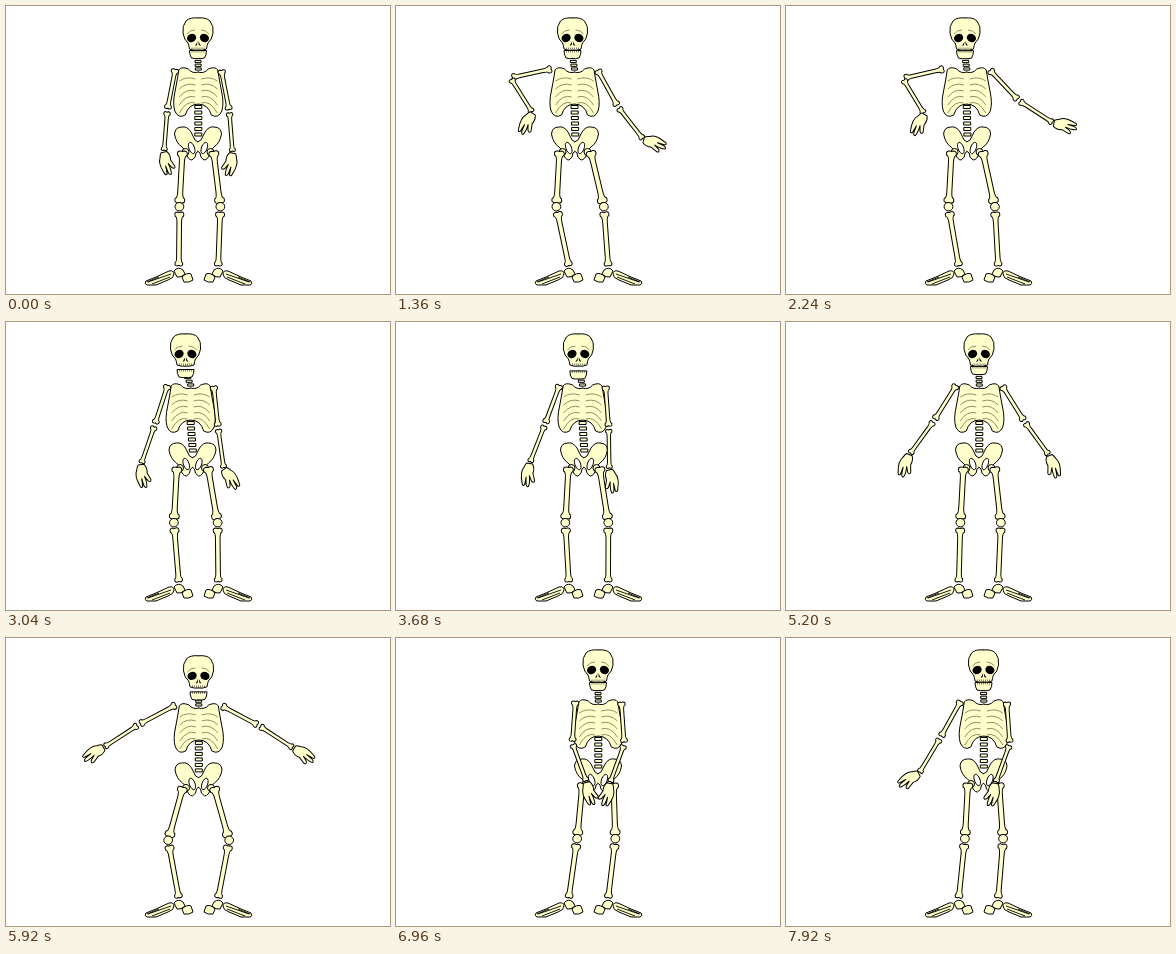
An HTML page with a canvas that plays this animation: 384x288 px, repeating every 8000 ms.

```html
<!DOCTYPE html>
<html lang="en">
<head>
<meta charset="utf-8">
<title>Talking skeleton</title>
<style>
html, body { margin: 0; width: 100%; height: 100%; overflow: hidden; background: #fff; }
canvas { display: block; width: 384px; height: 288px; }
</style>
</head>
<body>
<canvas id="stage" width="384" height="288"></canvas>
<script>
const g = document.getElementById('stage').getContext('2d');
const LOOP = 8000, STEP = 80, HOLD = .3;
const BONE = '#ffffcc', INK = '#000', SHADE = '#8f8f66';
const SIDES = [-1, 1], MID = 192.5, ARM = 42;

// Arm gestures: outward swing from straight down, in degrees
const arm = (upper, fore, hand) => ({ upper, fore, hand });
const hang = arm(11, 4.5, -11), low = arm(32, 36, 22), away = arm(18, 19, -7);
const akimbo = arm(78, -32, 32), point = arm(29, 38, 74), reach = arm(44, 58, 82);
const flick = arm(6, 8, 37), offer = arm(30, 31, 82), show = arm(29, 31, 62);
const cross = arm(-3, -28, -82), fold = arm(4, -20, -13);
const wide = arm(62, 57, 60), level = arm(82, 87, 88);

const pose = (t, x, left, right = left, lean = 0, mouth = 0) => ({ t, x, left, right, lean, mouth });
const poses = [
  pose(0, 192, hang),
  pose(1360, 179, akimbo, point, -2.5),
  pose(1800, 181, akimbo, reach, -2),
  pose(3040, 186.5, away, flick, -7, 3),
  pose(4320, 194, offer, cross),
  pose(5200, 193, low),
  pose(5600, 192.5, level),
  pose(5920, 192.5, wide, wide, 0, 3.5),
  pose(6160, 194, low),
  pose(6960, 202, fold),
  pose(7840, 197.5, show, fold),
  pose(LOOP, 197.5, show, fold)
];

const clamp = (n, a, b) => Math.min(b, Math.max(a, n));
const ease = k => k * k * (3 - 2 * k);

function mix(a, b, k) {
  if (typeof a === 'number') return a + (b - a) * k;
  return Object.fromEntries(Object.keys(a).map(key => [key, mix(a[key], b[key], k)]));
}

function poseAt(t) {
  const i = poses.findLastIndex(p => p.t <= t), a = poses[i], b = poses[i + 1];
  const k = (t - a.t) / (b.t - a.t);
  const p = mix(a, b, ease(clamp((k - HOLD) / (1 - HOLD), 0, 1)));
  // The jaw chatters between poses, the knees give way when both arms rise
  const words = Math.round((b.t - a.t) / 400);
  p.mouth += 2 * Math.sin(Math.PI * k * words) ** 2;
  p.drop = clamp((Math.min(p.left.upper, p.right.upper) - 45) * .23, 0, 4);
  return p;
}

function line(path, color = INK, width = 1) {
  g.strokeStyle = color;
  g.lineWidth = width;
  g.stroke(path);
}
function fill(path, color = BONE) {
  g.fillStyle = color;
  g.fill(path);
  line(path);
}
function oval(x, y, rx, ry, tilt = 0) {
  const path = new Path2D();
  path.ellipse(x, y, rx, ry, tilt, 0, 7);
  return path;
}
function at(x, y, draw, angle = 0, sx = 1, sy = 1) {
  g.save();
  g.translate(x, y);
  g.rotate(angle);
  g.scale(sx, sy);
  draw();
  g.restore();
}
const mirrored = (draw, x = 0) => SIDES.forEach(s => at(x, 0, draw, 0, s));

// Halves, drawn to the right of the middle line
const skull = new Path2D('M-.5 12Q8 11 12 15Q16 20 15 27Q14 34 10 37Q9 39 8.5 43Q4 45 -.5 44');
const jaw = new Path2D('M-.5 44.5H8.5Q8.5 49 6.5 52Q3 53 -.5 52.5');
const cage = new Path2D('M-.5 66Q6 68 10 63Q17 60 19.5 64Q21 74 23 84Q26 97 23.5 105Q20 113 13 109Q10 98 -.5 98');
const hips = new Path2D('M-.5 136L3 134Q5 130 7 126Q11 120 16 121Q23 121 23.5 128Q22 137 16 141Q13 143 12 147Q10 154 6 154Q2 152 2 147L-.5 145');
const nose = new Path2D('M.2 35L3 40L.8 39Z');
const brow = new Path2D('M3 24Q8 24 11 28');

const palm = new Path2D('M0-3Q4-6 9-5L16-8Q19-8 17-5L12-2Q19-4 23-3Q24-1 20 0L14 1L22 1Q24 3 20 4Q10 8 5 5Q1 4 0 3Z');
const toes = new Path2D('M163 265Q168 264 168 268Q168 272 162 274L150 279H141Q138 278 140 275L150 271Z');
const toeLines = new Path2D('M165 268L142 276M164 271L146 278M153 271L141 276');
const ankle = new Path2D('M168 265Q172 260 177 264L179 268Q175 272 171 271Z');
const heel = new Path2D('M176 271Q181 266 185 268L187 274Q183 277 178 276Z');

// Bone along a line; a and b are the half widths of its end knobs
function bone(x1, y1, x2, y2, w, a, b, trim1 = 0, trim2 = 0) {
  const half = (Math.hypot(x2 - x1, y2 - y1) - trim1 - trim2) / 2;
  const path = new Path2D();
  // dir runs out along one edge of the shaft, around the knob, to the other edge
  const end = (dir, r) => {
    const u = n => dir * (half - n), v = n => dir * n;
    path.lineTo(u(2.6 * r), v(-w));
    path.quadraticCurveTo(u(r), v(-w), u(r), v(-r));
    path.quadraticCurveTo(u(0), v(-r * 1.3), u(0), v(-r * .4));
    path.lineTo(u(.6), 0);
    path.lineTo(u(0), v(r * .4));
    path.quadraticCurveTo(u(0), v(r * 1.3), u(r), v(r));
    path.quadraticCurveTo(u(r), v(w), u(2.6 * r), v(w));
  };
  end(1, b);
  end(-1, a);
  path.closePath();
  const angle = Math.atan2(y2 - y1, x2 - x1);
  at(x1, y1, () => at(trim1 + half, 0, () => fill(path)), angle);
}

function spine(x1, y1, x2, y2, count, w, h) {
  for (let i = 0; i < count; i++) {
    const k = i / (count - 1), path = new Path2D();
    path.rect(mix(x1, x2, k) - w / 2, mix(y1, y2, k) - h / 2, w, h);
    fill(path);
  }
}

function foot() {
  at(-MID, 0, () => {
    fill(toes);
    line(toeLines, INK, .9);
    fill(heel);
    fill(ankle);
  });
}

function leg(side, x, drop) {
  const dx = x - MID;
  const bend = side < 0 ? Math.max(-1.5, 1 - dx / 2) + 3 * drop : 4.5 + 2.2 * drop;
  const hx = x + side * 15.5, hy = 145 + drop, ax = MID + side * 19.7;
  const kx = (hx + ax) / 2 + side * bend, ky = 201 + drop * .4;
  fill(oval(hx - side * 3, hy + 1, 3.5, 3.5));
  bone(hx, hy, kx, ky, 2.5, 4.6, 4.6, 0, 4);
  bone(kx, ky, ax, 260, 2.3, 4.2, 3.6, 5);
  fill(oval(kx, ky - .3, 4.4, 4.2));
}

function drawArm(side, x, y, { upper, fore, hand }) {
  const turn = deg => Math.PI / 2 - side * deg * Math.PI / 180;
  const u = turn(upper), f = turn(fore);
  const ex = x + ARM * Math.cos(u), ey = y + ARM * Math.sin(u);
  const wx = ex + ARM * Math.cos(f), wy = ey + ARM * Math.sin(f);
  bone(x, y, ex, ey, 1.8, 3.4, 3.2, 0, 1.5);
  bone(ex, ey, wx, wy, 1.7, 3, 2.8, 1.5, 1.5);
  at(wx, wy, () => fill(palm), turn(hand), 1, -side);
}

function pelvis() {
  mirrored(() => {
    fill(hips);
    fill(oval(6.3, 142, 2.8, 6, .35), '#fff');
  });
}

function chest() {
  mirrored(() => {
    fill(cage);
    for (let i = 0; i < 5; i++) {
      const y = 73 + i * 6;
      line(new Path2D(`M3 ${y}Q12 ${y - 3} 19 ${y + 2 + i * 2}`), SHADE);
    }
  });
}

function teeth(y) {
  for (let x = -6; x <= 6; x += 2) line(new Path2D(`M${x} ${y}v2`), INK, .5);
}

function head(mouth) {
  at(0, mouth, () => {
    mirrored(() => fill(jaw));
    teeth(44.5);
  });
  mirrored(() => {
    fill(skull);
    g.fillStyle = INK;
    g.fill(oval(6.4, 32, 4.7, 4, .4));
    g.fill(nose);
    line(brow, SHADE);
  });
  teeth(41.5);
}

function draw(t) {
  const { x, lean, mouth, drop, left, right } = poseAt(t);
  const cx = x + .3 + lean * .3;
  g.fillStyle = '#fff';
  g.fillRect(0, 0, 384, 288);
  g.lineJoin = 'round';
  mirrored(foot, MID);
  spine(cx, 101 + drop, x + .3, 128.5 + drop, 6, 7, 3);
  at(x, drop, pelvis);
  leg(-1, x, drop);
  leg(1, x, drop);
  spine(x + lean * .7, 55.5 + drop, cx, 63 + drop, 3, 6, 2.2);
  at(cx, drop, chest);
  drawArm(-1, cx - 23, 63 + drop, left);
  drawArm(1, cx + 23, 64 + drop, right);
  at(x + lean, drop * 1.5, () => head(mouth));
}

let start;
function tick(now) {
  start ??= now;
  draw(Math.floor((now - start) % LOOP / STEP) * STEP);
  requestAnimationFrame(tick);
}
draw(0);
requestAnimationFrame(tick);
</script>
</body>
</html>
```
